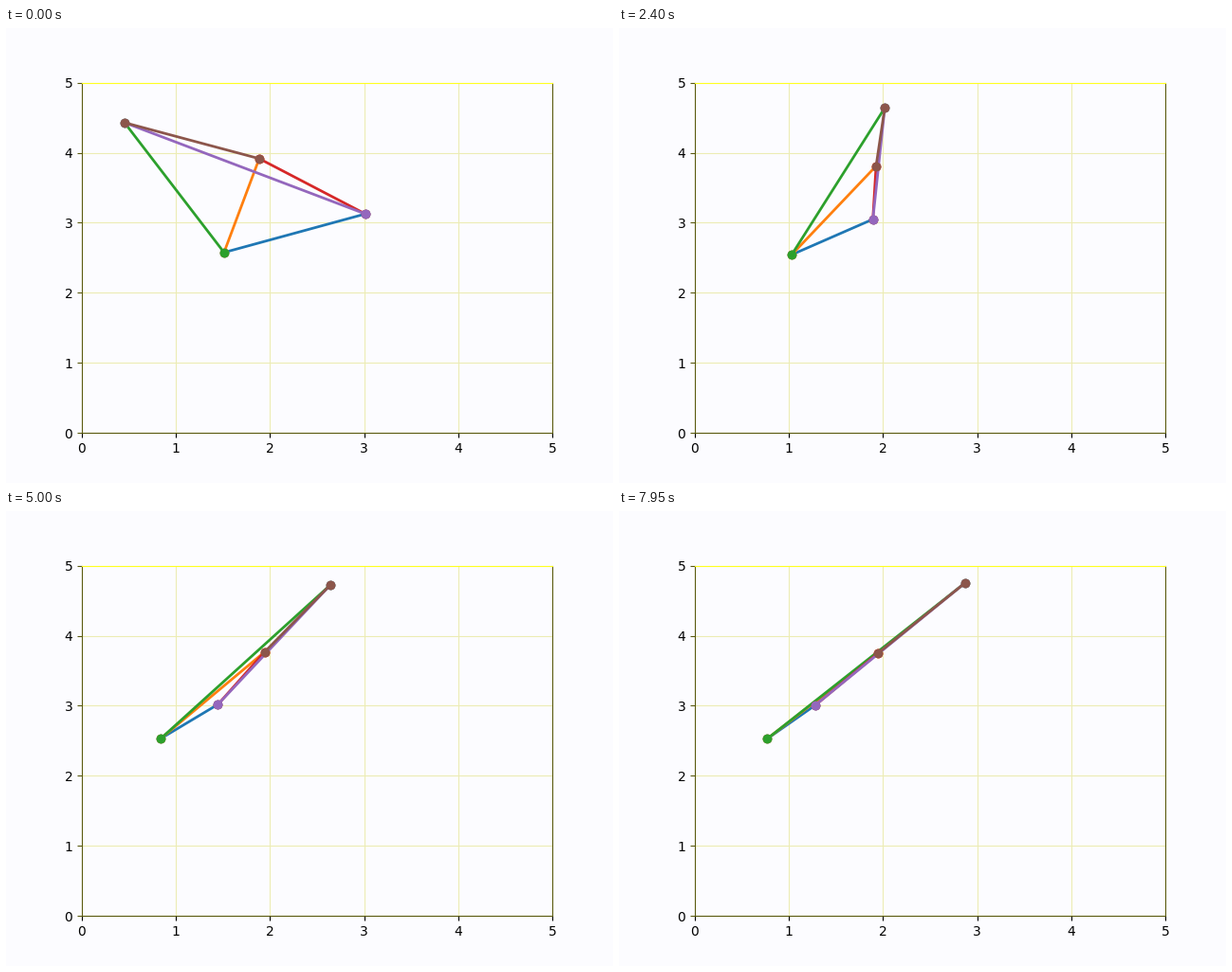
A matplotlib script for the animation above (8 s loop, 640 by 480 pixels).

```python
from itertools import combinations

import numpy as np
import matplotlib.pyplot as plt
from matplotlib.animation import FuncAnimation

FRAMES, INTERVAL = 160, 50
DECAY = 0.98          # share of the remaining distance kept per step
PAPER, GRID, OLIVE, YELLOW = "#fcfcff", "#ececb4", "#5a5a10", "#ffff20"

# Lower left, right, middle and top node
start = np.array([(1.511, 2.576), (3.013, 3.126), (1.885, 3.915), (0.453, 4.429)])
goal = np.array([(0.735, 2.524), (1.207, 3.003), (1.951, 3.745), (2.974, 4.767)])

plt.rcParams["font.family"] = "DejaVu Sans"
fig, ax = plt.subplots(figsize=(6.4, 4.8), dpi=100, facecolor=PAPER)
ax.set(xlim=(0, 5), ylim=(0, 5), xticks=range(6), yticks=range(6),
       facecolor=PAPER)
ax.grid(color=GRID, lw=0.8)
ax.tick_params(axis="y", color=OLIVE)
for side, spine in ax.spines.items():
    spine.set_color(YELLOW if side == "top" else OLIVE)

# Every pair of nodes is joined by a line in the next cycle colour
edges = [(list(pair), ax.plot([], [], "o-", lw=2, ms=6)[0])
         for pair in combinations(range(len(start)), 2)]


def update(i):
    nodes = goal + (start - goal) * DECAY ** i
    for pair, line in edges:
        line.set_data(*nodes[pair].T)
    return [line for _, line in edges]


anim = FuncAnimation(fig, update, frames=FRAMES, interval=INTERVAL,
                     repeat=True, repeat_delay=0, blit=False)
plt.show()
```
